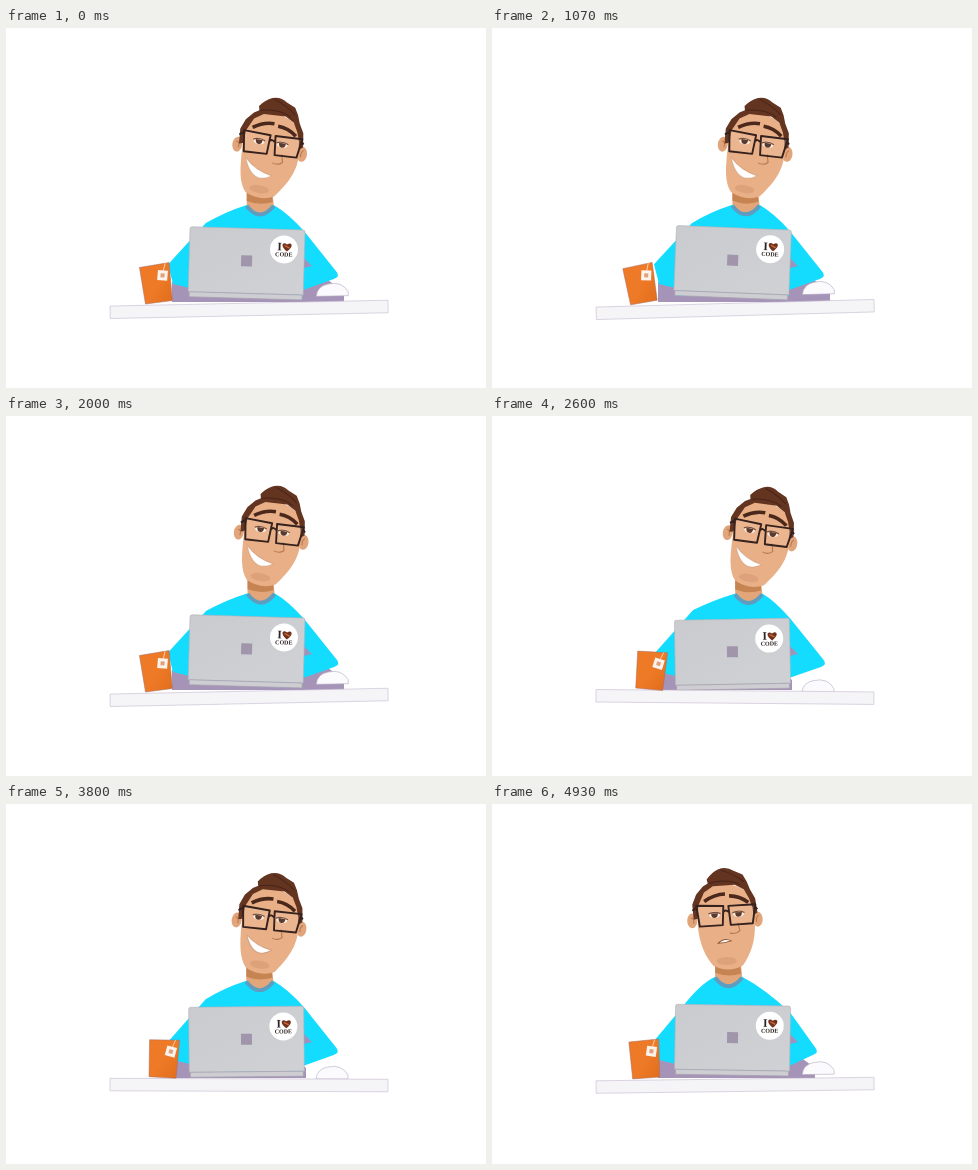
Animation, 480 px wide and 360 px high, one loop 5000 ms. Source, as an HTML page:

```html
<!DOCTYPE html>
<html lang="en">
<head>
<meta charset="utf-8">
<title>At the desk</title>
<style>
  html, body { margin: 0; width: 100%; height: 100%; overflow: hidden; background: #fff; }
  svg { display: block; width: 100vw; height: 100vh; }
  text { font-family: "Liberation Serif", "Noto Serif", serif; font-weight: bold; fill: #2c211f; text-anchor: middle; }
</style>
</head>
<body>
<svg viewBox="0 0 480 360">
  <defs>
    <linearGradient id="orange" x1="0" y1="0" x2="1" y2="1">
      <stop offset=".5" stop-color="#ee7a27"/><stop offset="1" stop-color="#e06d1c"/>
    </linearGradient>
    <linearGradient id="metal" x1="0" y1="0" x2="1" y2="1">
      <stop offset="0" stop-color="#cacbcf"/><stop offset="1" stop-color="#d0d1d5"/>
    </linearGradient>
  </defs>

  <path id="shade" fill="#a594b7"/>
  <path id="shirt" fill="#14dcff"/>
  <path d="M298 230L306 238L298 240Z" fill="#9b94bd"/>

  <g id="neck">
    <path d="M-13-22L-13-2Q0 15 14-2L12-22Z" fill="#e3a67a"/>
    <path d="M-13-16L12-16L13-5Q0-1-13-6Z" fill="#c78453"/>
    <path d="M-13-1Q0 16 14-1" fill="none" stroke="#5f9dc0" stroke-width="4"/>
  </g>

  <g id="head">
    <ellipse cx="-33.5" cy="7" rx="5" ry="7.5" fill="#e2a57b"/>
    <ellipse cx="32" cy="7" rx="5" ry="7.5" fill="#e2a57b"/>
    <path d="M-35 4Q-31 4-32 10M33 3Q30 5 31 10" fill="none" stroke="#b97849"/>
    <path id="face" fill="#e9af86"/>
    <ellipse id="stubble" cy="48" rx="10" ry="4" fill="#dea27b"/>
    <path d="M-32 6L-33-9L-29-19L-22-27L-17-30L-18-34Q-13-41-6-44Q2-47 9-42L18-38L22-31L25-23L30-14L32 0L28 3L27-5L24-14L19-23L10-28L-12-27L-21-21L-27-8L-28 5Z" fill="#633420"/>
    <path d="M-16-30Q2-35 15-28M-4-43Q9-39 19-31" fill="none" stroke="#472319"/>
    <path d="M-21-12Q-11-19 0-19M4-17Q14-17 23-10" fill="none" stroke="#4b281c" stroke-width="3.6"/>
    <g id="eyeL"></g>
    <g id="eyeR"></g>
    <path d="M12 10L14 18Q10 22 4 20" fill="none" stroke="#b9794e" stroke-width="1.1"/>
    <path d="M-29-8L-2-7L-3 12L-26 13ZM3-7L30-8L27 11L5 12ZM-2-1Q0-4 3-1M-29-6L-33-3M29-6L32-3" fill="#fff" fill-opacity=".08" stroke="#35211d" stroke-width="1.9" stroke-linejoin="round"/>
    <path id="mouth" fill="#fff" stroke="#8f5534"/>
  </g>

  <g id="laptop">
    <path d="M185 202H296Q298 202 298 204V267H183V204Q183 202 185 202Z" fill="url(#metal)" stroke="#b4b2bb" stroke-width=".6"/>
    <path d="M184 267H297V272H184Z" fill="#cdcdd2" stroke="#a5a1ad" stroke-width=".7"/>
    <rect x="235" y="229" width="11" height="11" fill="#a095ab"/>
    <circle cx="277.5" cy="222" r="14" fill="#fff"/>
    <text x="273" y="223" font-size="11.5">I</text>
    <path d="M280.5 224C273 218.5 276 213.5 280.5 217C285 213.5 288 218.5 280.5 224Z" fill="#70331f"/>
    <path d="M278 218L283 220.5" stroke="#d66a35" stroke-width="1.3"/>
    <text x="277.5" y="229" font-size="6">CODE</text>
  </g>

  <g id="hands" fill="#fff">
    <path d="M165 271Q164 264 171 263Q175 259 182 262Q185 268 200 269L203 276H166Z"/>
    <circle cx="302" cy="264" r="6" stroke="#a594b7" stroke-width=".6"/>
  </g>
  <path id="mouse" d="M-16 13Q-15 3-4 1Q10-2 16 9V13Z" fill="#fbfafc" stroke="#b7aac4" stroke-width=".6"/>
  <path id="table" d="M-139 0H139V12.5H-139Z" fill="#f5f4f6" stroke="#c6b9d1" stroke-width=".6"/>
  <g id="mug">
    <path d="M0-37H30L27 1L0 0Z" fill="url(#orange)" stroke="#a76b63" stroke-width=".5"/>
    <path d="M26-37L23-30" stroke="#f9dfca" stroke-width=".8"/>
    <g transform="translate(21.5 -25.5) rotate(14)">
      <rect x="-5" y="-5" width="10" height="10" fill="#fcf3ed"/>
      <rect x="-2" y="-2" width="4" height="4" fill="#e0a27c"/>
    </g>
  </g>
</svg>
<script>
const $ = id => document.getElementById(id);
const draw = (id, d) => $(id).setAttribute('d', d);
const place = (id, x, y, a = 0) => $(id).setAttribute('transform', `translate(${x} ${y}) rotate(${a})`);
const clamp = v => Math.max(0, Math.min(1, v));
const mix = (a, b, k) => a.map((v, i) => v + (b[i] - v) * k);

for (const id of ['eyeL', 'eyeR'])
  $(id).innerHTML = `<ellipse rx="5.5" ry="3.2" fill="#fdeee2"/><path d="M-3.4-1.5H3.4A3.4 4.6 0 0 1-3.4-1.5Z" fill="#4d2a1d"/>
    <path d="M-6-1Q0-4 6-1" fill="none" stroke="#70402a" stroke-width="1.3"/>`;

// Seconds, head x, y, angle, grin, worry
const poses = [
  [0, 265.5, 114.5, 9, 1, 0],
  [1.07, 265, 114.5, 9, 1, 0],
  [2, 267, 114.5, 9, 1, 0],
  [2.6, 270, 115.5, 10, 1, 0],
  [3.33, 269.5, 115, 10, 1, 0],
  [3.7, 269, 115, 9.5, 1, 0],
  [4.13, 238, 106, 0, 0, 0],
  [4.27, 238, 107, -0.5, 0, 0],
  [4.6, 236, 105, -1, 0, 0.7],
  [4.934, 233.5, 109, -1.5, 0, 1]
];

// Left corner, upper control, right corner, lower control
const grinLips = [-23, 19, -12, 30, 5, 33, -13, 45];
const smirkLips = [-9, 30, -1, 33, 6, 26, -1, 43];
const worryLips = [-8, 30, -2, 24, 5, 28, -2, 30];

function poseAt(t) {
  const i = Math.max(1, poses.findIndex(p => p[0] >= t));
  const a = poses[i - 1], b = poses[i];
  const k = clamp((t - a[0]) / (b[0] - a[0]));
  return mix(a, b, k * k * (3 - 2 * k));
}

function render(t) {
  const [, x, y, angle, grin, worry] = poseAt(t);
  const rock = Math.cos(2 * Math.PI * (t - 1 / 6));

  place('head', x, y, angle);
  const j = -5 * grin;
  draw('face', `M-28-20L-28 12C-27 30 ${-21 + j} 44 ${-13 + j} 53Q${2 + j} 60 ${16 + j} 53C${24 + j} 42 30 28 29 8L25-18Q10-32-14-30Z`);
  $('stubble').setAttribute('cx', j);
  place('eyeL', -11 - grin * 1.5, 1.5 - grin);
  place('eyeR', 13 - grin * 2, 1 - grin * 0.5);
  const m = mix(mix(smirkLips, worryLips, worry), grinLips, grin);
  draw('mouth', `M${m[0]} ${m[1]}Q${m[2]} ${m[3]} ${m[4]} ${m[5]}Q${m[6]} ${m[7]} ${m[0]} ${m[1]}Z`);
  $('mouth').setAttribute('stroke-opacity', 1 - grin * 0.8);

  const nx = 254 + (x - 266) * 0.55, ny = 179 - (266 - x) * 0.13;
  place('neck', nx, ny);
  const lean = 254 - nx;
  const elbow = 332 - lean * 0.4;
  draw('shirt', `M${nx - 13} ${ny - 2}Q${nx - 35 + lean * 0.4} ${ny + 5} ${200 - lean * 0.5} ${195 + lean * 0.4}L162 ${237 - rock}L167 256L184 260V268H297V262L${elbow - 4} 251Q${elbow + 3} 248 ${elbow - 2} 243L298 ${203 + lean * 0.3}Q${282 - lean * 0.5} 185 ${nx + 14} ${ny - 2}Z`);
  const edge = 300 + 38 * clamp(rock + 0.5);
  draw('shade', `M166 254L300 252L${edge - 16} 252L${edge} 264V274H166Z`);

  $('laptop').setAttribute('transform', `translate(0 ${-0.4 * rock}) rotate(${0.7 + 1.9 * rock} 290 238)`);
  place('table', 243, 275 + 0.3 * rock, -0.6 - 1.2 * rock);
  place('mug', 141 - 3 * rock, 274.6 + 2.8 * rock, -5 - 8.8 * rock);
  place('mouse', 326, 258 - 6 * rock, -0.6 - 1.2 * rock);
  $('hands').style.display = t > 4.05 && t < 4.5 ? '' : 'none';
}

let shown = -1;
const start = performance.now();
function tick() {
  const step = Math.floor((performance.now() - start) * 0.015 + 0.06) % 75;
  if (step !== shown) render((shown = step) / 15);
  requestAnimationFrame(tick);
}
tick();
</script>
</body>
</html>
```
